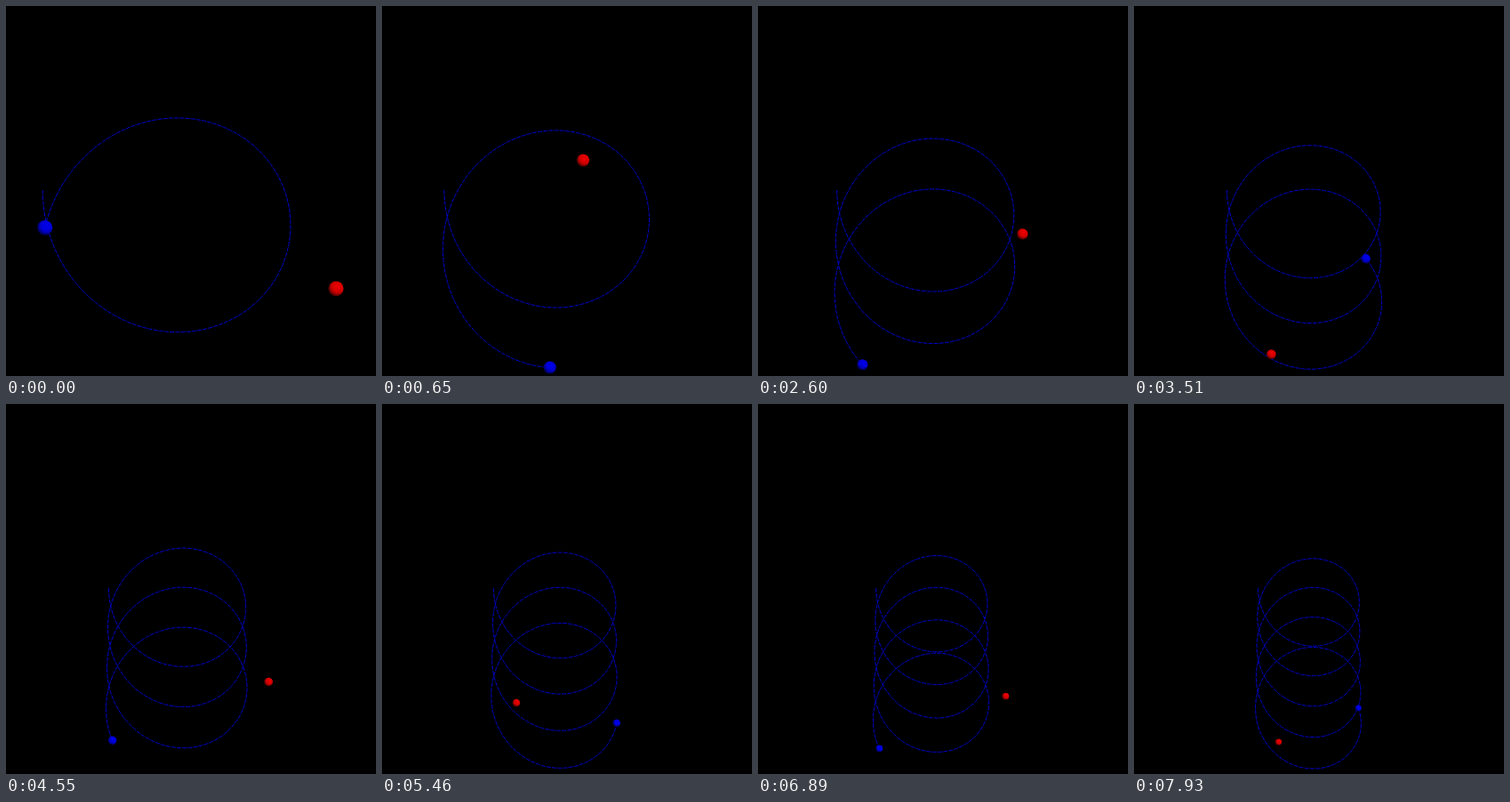
Recreate the animation shown at these times as an HTML page with a canvas. Size 416 by 416 pixels, loop 8000 ms.

```html
<!DOCTYPE html>
<html lang="en">
<head>
<meta charset="utf-8">
<title>Two drifting charges</title>
<style>
  html, body { margin: 0; height: 100%; overflow: hidden; background: #000; }
  canvas { display: block; }
</style>
</head>
<body>
<canvas id="stage" width="416" height="416"></canvas>
<script>
const ctx = document.getElementById('stage').getContext('2d');
const LOOP = 8000, STEP = 130;
const RADIUS = 56.4, OFFSET = 11, DRIFT = 5.1, APPROACH = 0.00174, BALL = 3.4;

// Orbit phase at [ms, radians]; linear in between
const phases = [[0, 6.037], [1300, 9.74], [2600, 13.375], [3510, 16.36],
                [5460, 21.83], [6890, 25.6], [7930, 28.6]];

function phaseAt(ms) {
  const i = Math.max(1, phases.findIndex(p => p[0] >= ms));
  const [t0, a0] = phases[i - 1], [t1, a1] = phases[i];
  return a0 + (a1 - a0) * (ms - t0) / (t1 - t0);
}

// side: -1 is the blue charge, 1 the red one; both drift down and come nearer
function position(side, a) {
  const near = 1 + APPROACH * a;
  return [near * side * (OFFSET + RADIUS * Math.cos(a)),
          near * (DRIFT * a - side * RADIUS * Math.sin(a))];
}

// The view zooms out just enough to hold everything reached so far
function zoomAt(phase) {
  let reach = 0;
  for (let a = 0; a <= phase; a += 0.01) {
    reach = Math.max(reach, position(-1, a)[1] + 3.5, position(1, a)[1] + 2.5);
  }
  return 206.7 / reach;
}

function drawTrail(phase, zoom) {
  ctx.beginPath();
  for (let a = 0; a < phase; a += 0.03) {
    const [x, y] = position(-1, a);
    ctx.lineTo(x * zoom, y * zoom);
  }
  const [x, y] = position(-1, phase);
  ctx.lineTo(x * zoom, y * zoom);
  ctx.strokeStyle = '#0000d0';
  ctx.lineWidth = 1;
  ctx.setLineDash([5, 1.2]);
  ctx.stroke();
}

function drawBall(side, phase, zoom, shade) {
  const [x, y] = position(side, phase).map(v => v * zoom);
  const r = BALL * zoom * (1 + APPROACH * phase);
  const lx = x + 0.22 * r, ly = y - 0.3 * r;
  const fill = ctx.createRadialGradient(lx, ly, 0, lx, ly, 1.38 * r);
  fill.addColorStop(0, shade(240));
  fill.addColorStop(0.55, shade(210));
  fill.addColorStop(1, shade(70));
  ctx.fillStyle = fill;
  ctx.beginPath();
  ctx.arc(x, y, r, 0, 2 * Math.PI);
  ctx.fill();
}

function draw(now) {
  const ms = Math.floor((now % LOOP) / STEP) * STEP;
  const phase = phaseAt(ms), zoom = zoomAt(phase);
  ctx.setTransform(1, 0, 0, 1, 0, 0);
  ctx.fillStyle = '#000';
  ctx.fillRect(0, 0, 416, 416);
  ctx.translate(207.4, 206.9);
  drawTrail(phase, zoom);
  drawBall(-1, phase, zoom, v => `rgb(0,0,${v})`);
  drawBall(1, phase, zoom, v => `rgb(${v},0,0)`);
}

const start = performance.now();
function tick() {
  draw(performance.now() - start);
  requestAnimationFrame(tick);
}
tick();
</script>
</body>
</html>
```
